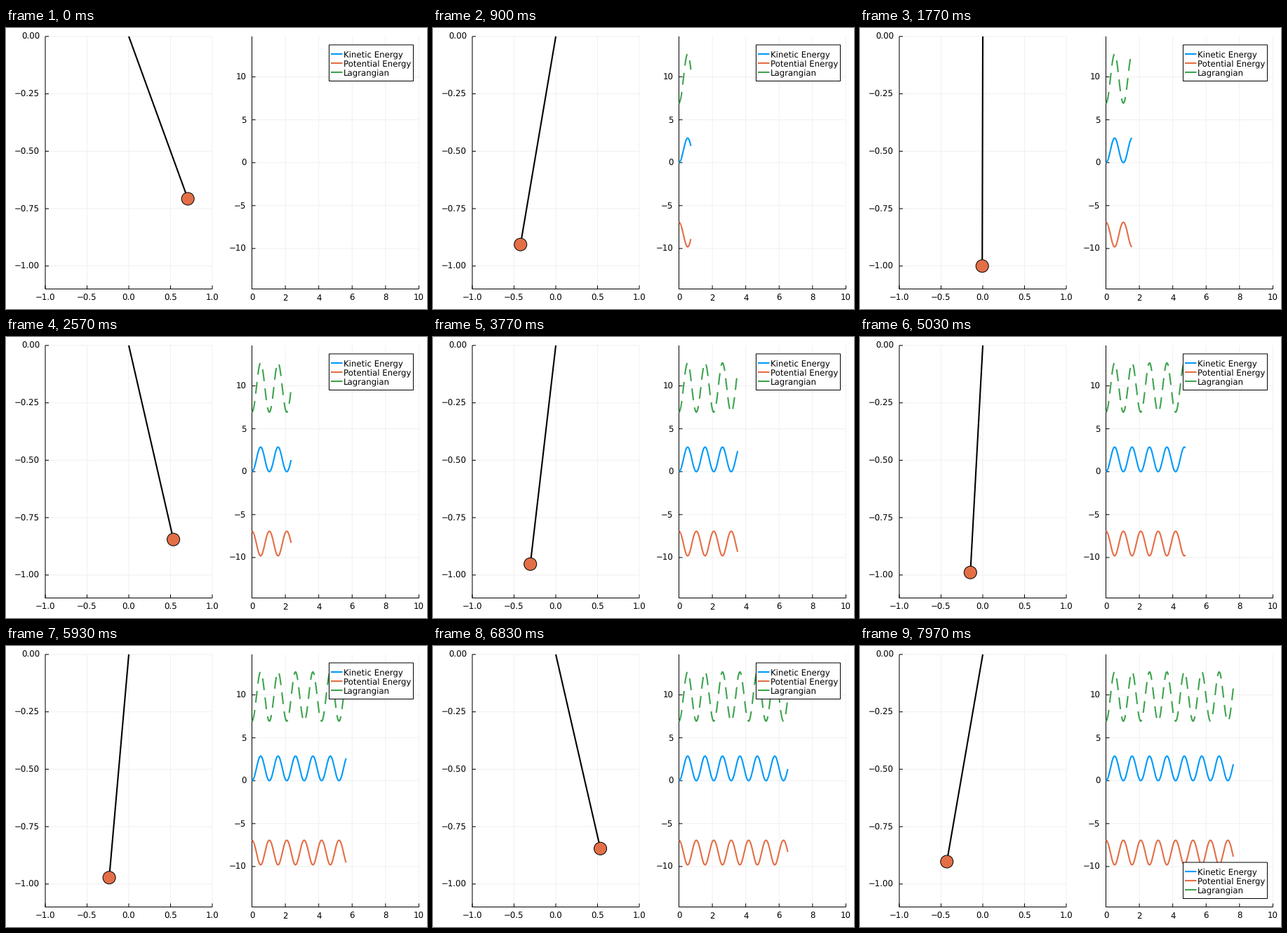
A matplotlib script that plays this animation: 600 px wide and 400 px high, repeating every 8 s.

```python
import numpy as np
import matplotlib.pyplot as plt
from matplotlib.animation import FuncAnimation
from matplotlib.patches import Circle, Rectangle

W, H, DPI = 600, 400, 100
TICK_MS, TICKS = 20, 400           # 400 x 20 ms = one loop
STEPS_PER_TICK = 0.6               # solver steps appear at 30 per second
STEPS = 240
PX = 72 / DPI                      # points per pixel
FONT = 11.7 * PX
THICK = 2.1
G = 9.81
BLUE, ORANGE, GREEN = "#009AFA", "#E36F47", "#3EA44E"
TOP, BOTTOM = 12, 371.5

plt.rcParams.update({"font.family": "DejaVu Sans", "path.snap": False,
                     "text.hinting": "none"})


def sample_times():
    """Solver steps: short at first, then settling at a constant."""
    n = np.arange(STEPS)
    step, lag = 0.0326, 5.09
    return step * (n - lag * (1 - np.exp(-n / lag)))


def swing(times, substeps=6):
    """Angle and speed of a unit pendulum released at 45 degrees (RK4)."""
    def rate(s):
        return np.array([s[1], -G * np.sin(s[0])])

    state = np.array([np.pi / 4, 0.0])
    path = [state]
    for gap in np.diff(times):
        h = gap / substeps
        for _ in range(substeps):
            a = rate(state)
            b = rate(state + h / 2 * a)
            c = rate(state + h / 2 * b)
            d = rate(state + h * c)
            state = state + h / 6 * (a + 2 * b + 2 * c + d)
        path.append(state)
    return np.array(path).T


class Panel:
    """Maps data to stage pixels and draws grid, axes and tick labels."""

    def __init__(self, left, right, xlim, ylim):
        self.left, self.right = left, right
        self.xlim, self.ylim = xlim, ylim

    def x(self, v):
        lo, hi = self.xlim
        return self.left + (v - lo) / (hi - lo) * (self.right - self.left)

    def y(self, v):
        lo, hi = self.ylim
        return BOTTOM - (v - lo) / (hi - lo) * (BOTTOM - TOP)

    def draw(self, xticks, yticks, xfmt, yfmt):
        for v in xticks:
            line([self.x(v)] * 2, [TOP, BOTTOM], "#F0F0F0", 1, 1)
        for v in yticks:
            line([self.left, self.right], [self.y(v)] * 2, "#F0F0F0", 1, 1)
        line([self.left, self.left, self.right], [TOP, BOTTOM, BOTTOM],
             "black", 1, 2)
        for v in xticks:
            line([self.x(v)] * 2, [BOTTOM, BOTTOM - 5], "black", 1, 2)
            label(self.x(v), 387.5, xfmt.format(v), "center")
        for v in yticks:
            line([self.left, self.left + 5], [self.y(v)] * 2, "black", 1, 2)
            label(self.left - 8, self.y(v) + 4.3, yfmt.format(v), "right")


def line(x, y, color, width, z, **kw):
    return ax.plot(x, y, color=color, lw=width * PX, zorder=z,
                   solid_capstyle="butt", dash_capstyle="butt",
                   solid_joinstyle="round", dash_joinstyle="round", **kw)[0]


def label(x, y, text, align, z=3):
    return ax.text(x, y, text.replace("-", "\u2212"), ha=align, va="baseline",
                   fontsize=FONT, color="black", zorder=z)


def legend(dy):
    """Legend box shifted down by dy; returns its artists."""
    box = Rectangle((460.5, 24 + dy), 120, 51.5, fc="white", ec="black",
                    lw=PX, zorder=8)
    parts = [ax.add_patch(box)]
    entries = [("Kinetic Energy", BLUE), ("Potential Energy", ORANGE),
               ("Lagrangian", GREEN)]
    for i, (name, color) in enumerate(entries):
        y = 37 + 13 * i + dy
        parts.append(line([463, 479.5], [y, y], color, THICK, 9))
        parts.append(label(481, y + 4.2, name, "left", 9))
    return parts


fig = plt.figure(figsize=(W / DPI, H / DPI), dpi=DPI, facecolor="white")
ax = fig.add_axes([0, 0, 1, 1])
ax.set_xlim(0, W)
ax.set_ylim(H, 0)
ax.axis("off")

space = Panel(56, 294, (-1, 1), (-1.1, 0))
energy = Panel(350.5, 588.5, (0, 10), (-1.5 * G, 1.5 * G))
space.draw([-1, -0.5, 0, 0.5, 1], [0, -0.25, -0.5, -0.75, -1],
           "{:.1f}", "{:.2f}")
energy.draw([0, 2, 4, 6, 8, 10], [-10, -5, 0, 5, 10], "{}", "{}")

t = sample_times()
theta, omega = swing(t)
kinetic = omega ** 2 / 2
potential = -G * np.cos(theta)
bob_x, bob_y = space.x(np.sin(theta)), space.y(-np.cos(theta))
time_x = energy.x(t)

rod = line([], [], "black", THICK, 4)
bob = ax.add_patch(Circle((0, 0), 9, fc=ORANGE, ec="black", lw=PX, zorder=5))
curves = [
    (line([], [], BLUE, THICK, 4), energy.y(kinetic)),
    (line([], [], ORANGE, THICK, 4), energy.y(potential)),
    (line([], [], GREEN, THICK, 4, dashes=(8, 5)),
     energy.y(kinetic - potential)),
]
upper, lower = legend(0), legend(284)


def draw(tick):
    n = round(tick * STEPS_PER_TICK)
    rod.set_data([space.x(0), bob_x[n]], [TOP, bob_y[n]])
    bob.center = bob_x[n], bob_y[n]
    for curve, y in curves:
        curve.set_data(time_x[:n + 1], y[:n + 1])
    # The legend drops once the curves reach the last quarter of the axis.
    crowded = t[n] >= 7.5
    for part in upper:
        part.set_visible(not crowded)
    for part in lower:
        part.set_visible(crowded)
    return []


anim = FuncAnimation(fig, draw, frames=TICKS, interval=TICK_MS,
                     init_func=lambda: draw(0), repeat=True, repeat_delay=0,
                     blit=False)
plt.show()
```
